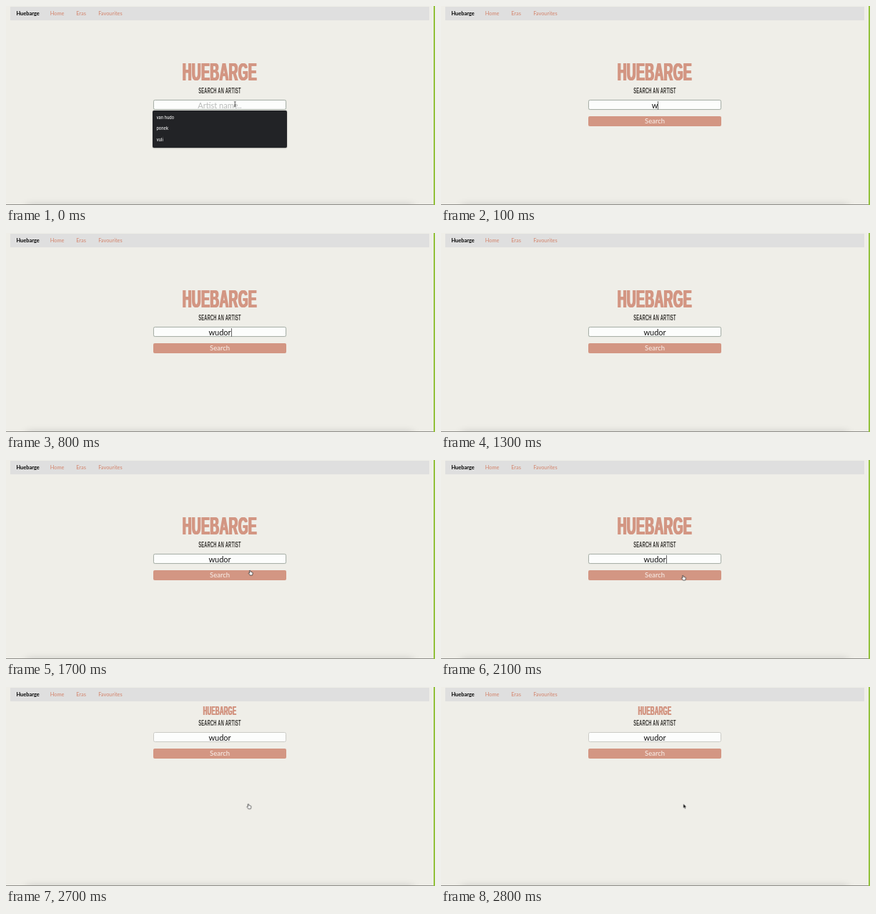
An HTML page for the animation above (5 s loop, 600x278 px).

```html
<!DOCTYPE html>
<html lang="en">
<head>
<meta charset="utf-8">
<title>Artist search</title>
<style>
html, body { margin: 0; width: 100%; height: 100%; overflow: hidden; }
body { position: relative; background: #efeee8; font-family: Lato, sans-serif; }
body * { box-sizing: border-box; }
nav, nav span, .title, .sub, .form, .field, .button, .list, .shade, .line, .edge, svg { position: absolute; }

/* every part shares one stepped five second clock */
.anim { animation: 5s step-end infinite; }

nav { left: 6px; top: 1px; width: 586px; height: 19px; background: #dfdfdf; font-size: 7.4px; line-height: 20px; color: #d3846c; white-space: nowrap; }
nav span { top: 0; }
nav .brand { font-weight: 700; color: #000; }

.title, .sub { left: 0; width: 598px; text-align: center; white-space: nowrap; transform: scaleX(.5);
  font-family: "Liberation Sans", Arial, sans-serif; font-weight: 700; }
.title { top: 71.5px; height: 40px; line-height: 40px; font-size: 35px; letter-spacing: .03em; color: #d39683;
  text-shadow: .05em 0, -.05em 0; animation-name: title; }
.sub { top: 108px; height: 20px; line-height: 20px; font-size: 11.3px; letter-spacing: .05em; color: #35332f; }

.form { left: 0; top: 0; width: 598px; height: 200px; animation-name: form; }
.field { left: 206px; top: 131px; width: 186px; height: 14px; border: 1px solid #a9b0a8; border-radius: 2.5px;
  background: #fcfdfc; text-align: center; font-size: 11px; line-height: 14px; white-space: nowrap; color: #111; animation-name: field; }
.hint { position: absolute; inset: 0; color: #b9bbba; animation-name: hint; }
.caret { display: inline-block; width: 1px; height: 12px; margin: 1px -1px 0 0; background: #666; vertical-align: top; animation-name: caret; }
.button { left: 206px; top: 154px; width: 186px; height: 14px; border-radius: 2px; background: #d39683;
  color: #faf3ee; font-size: 9.5px; line-height: 14px; text-align: center; }
.list { left: 205.4px; top: 146.4px; width: 187.8px; height: 52px; padding: 3px 5px; border-radius: 2px; background: #222326;
  box-shadow: 0 .5px 1.5px rgba(0,0,0,.4); color: #f1f1f1; font: 500 5.6px/15.1px Inter, sans-serif; animation-name: hint; }

.shade { left: 30px; top: 280px; width: 538px; height: 10px; box-shadow: 0 0 12px 1px rgba(0,0,0,.22); }
.line { left: 0; top: 277px; width: 598px; height: 1px; background: #8f8e89; }
.edge { left: 598px; top: 0; width: 2px; height: 278px; background: #93c13d; }

svg { left: 0; top: 0; }
.mouse { animation-name: mouse; }
.beam { animation-name: beam; }
.hand { animation-name: hand; }
.arrow { animation-name: arrow; }

.k1 { animation-name: k1; } .k2 { animation-name: k2; } .k3 { animation-name: k3; }
.k4 { animation-name: k4; } .k5 { animation-name: k5; }
@keyframes k1 { 0% { font-size: 0; } 2%, to { font-size: 11px; } }
@keyframes k2 { 0% { font-size: 0; } 6%, to { font-size: 11px; } }
@keyframes k3 { 0% { font-size: 0; } 10%, to { font-size: 11px; } }
@keyframes k4 { 0% { font-size: 0; } 12%, to { font-size: 11px; } }
@keyframes k5 { 0% { font-size: 0; } 16%, to { font-size: 11px; } }

@keyframes hint { 0% { visibility: visible; } 2%, to { visibility: hidden; } }
@keyframes caret { 0%, 26%, 46%, to { opacity: 0; } 2%, 36% { opacity: 1; } }
@keyframes title {
  0% { top: 71.5px; font-size: 35px; }
  54%, to { top: 13.8px; font-size: 15.6px; }
}
@keyframes form { 0% { transform: none; } 54%, to { transform: translateY(-68px); } }
@keyframes field {
  0% { border-color: #a9b0a8; box-shadow: 0 0 1px rgba(130,150,135,.45); }
  50% { border-color: #a3a5a1; box-shadow: none; }
  54%, to { border-color: #cbcbc6; box-shadow: none; }
}
@keyframes mouse {
  0% { transform: translate(320.3px, 137px); }
  30% { transform: translate(343px, 139px); }
  32% { transform: translate(342.5px, 147px); }
  34% { transform: translate(341px, 154px); }
  36% { transform: translate(340px, 158px); }
  38% { transform: translate(339px, 160px); }
  40% { transform: translate(338.4px, 160.8px); }
  42% { transform: translate(338.2px, 161px); }
  44% { transform: translate(338.3px, 161.6px); }
  46% { transform: translate(338.5px, 162.2px); }
  48% { transform: translate(338.6px, 162.8px); }
  50%, to { transform: translate(338.7px, 163.2px); }
}
@keyframes beam { 0%, 30% { visibility: visible; } 2%, 32%, to { visibility: hidden; } }
@keyframes hand { 0%, 56%, to { visibility: hidden; } 34% { visibility: visible; } }
@keyframes arrow { 0%, 34% { visibility: hidden; } 32%, 56%, to { visibility: visible; } }
</style>
</head>
<body>
<nav>
  <span class="brand" style="left:8.5px">Huebarge</span>
  <span style="left:55.8px">Home</span>
  <span style="left:92.2px">Eras</span>
  <span style="left:123.2px">Favourites</span>
</nav>

<div class="title anim">HUEBARGE</div>

<div class="form anim">
  <div class="sub">SEARCH AN ARTIST</div>
  <div class="field anim"><span class="hint anim">Artist name..</span><span class="k1 anim">w</span><span class="k2 anim">u</span><span class="k3 anim">d</span><span class="k4 anim">o</span><span class="k5 anim">r</span><i class="caret anim"></i></div>
  <div class="button">Search</div>
  <div class="list anim">
    <div>van hudo</div>
    <div>ponek</div>
    <div>vuli</div>
  </div>
</div>

<div class="shade"></div>
<div class="line"></div>
<div class="edge"></div>

<svg width="600" height="278" viewBox="0 0 600 278" aria-hidden="true">
  <g class="mouse anim">
    <path class="beam anim" d="M-1.3-3.4Q0-3.4 0-2.6Q0-3.4 1.3-3.4M0-2.6V2.6M-1.3 3.4Q0 3.4 0 2.6Q0 3.4 1.3 3.4M-.7.9H.7" fill="none" stroke="#222" stroke-width=".8"/>
    <path class="hand anim" d="M-.6.6Q0-.4.7.5L1.1 2.4Q1.8 1.9 2.2 2.6Q2.9 2.2 3.2 2.9Q4.1 2.7 4.1 3.8Q4.1 5.8 3.4 7H.2Q-.6 5.5-1.9 4.3Q-1.7 3.2-.3 4.1Z" fill="#fff" stroke="#222" stroke-width=".7" stroke-linejoin="round"/>
    <path class="arrow anim" d="M.2 0V6.1L1.6 4.8L2.5 6.9L3.5 6.5L2.6 4.4H4.5Z" fill="#000" stroke="#fff" stroke-width=".35"/>
  </g>
</svg>
</body>
</html>
```
